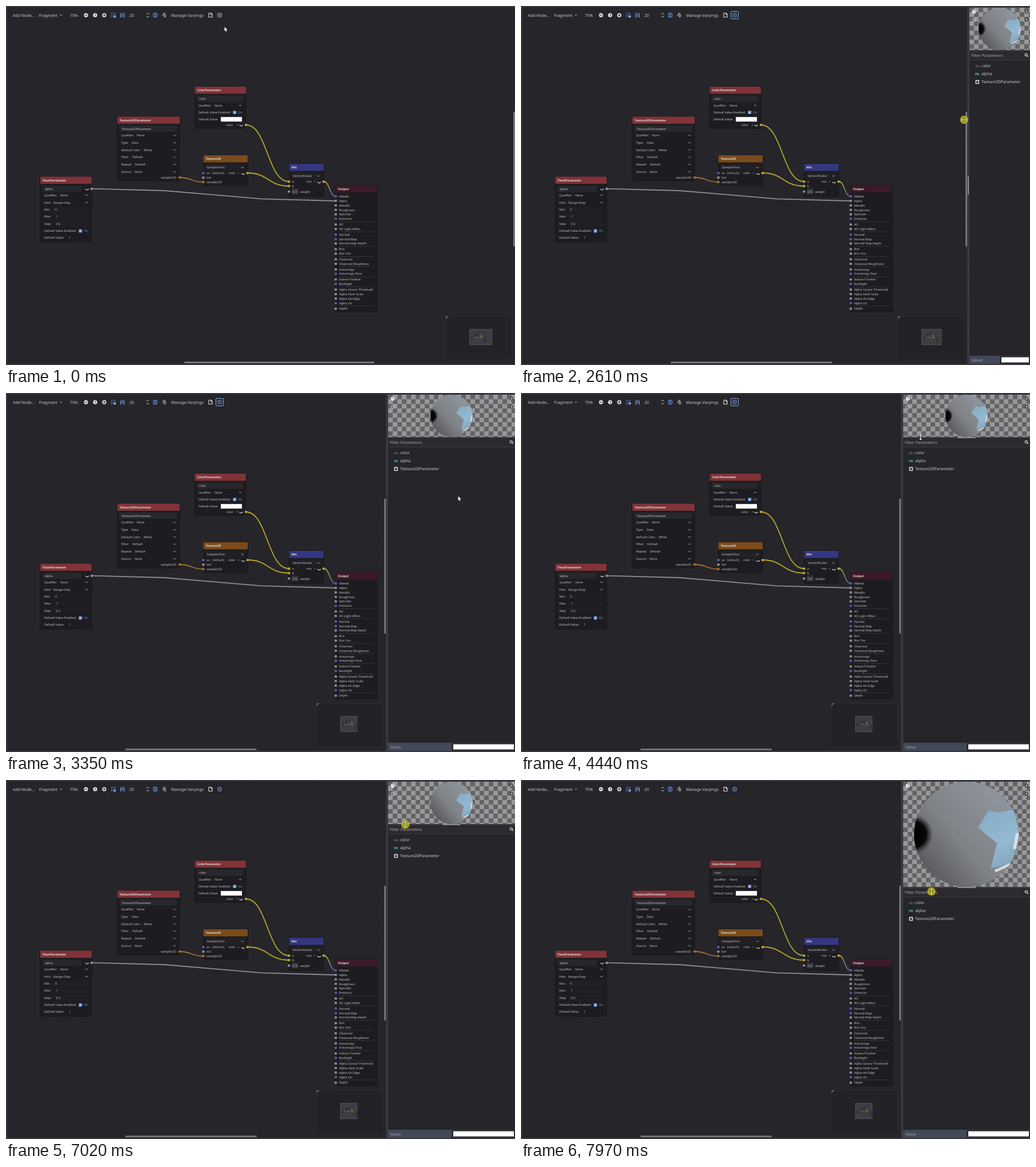
Animation, 891 px wide and 628 px high, one loop 8000 ms. Source, as an HTML page with a canvas:

```html
<!DOCTYPE html>
<html>
<head>
<meta charset="utf-8">
<title>Shader graph</title>
<style>
html, body { margin: 0; width: 100%; height: 100%; overflow: hidden; background: #25252a; }
canvas { display: block; }
</style>
</head>
<body>
<canvas id="stage" width="891" height="628"></canvas>
<script>
const W = 891, H = 628, LOOP = 8000;
const FONT = '"Noto Sans", "Open Sans", sans-serif';
const GREY = '#929296', YELLOW = '#b5a52c', PURPLE = '#5c5ab0', ORANGE = '#a8702c';
const BG = '#25252a', FRAME = '#38383f', BLUE = '#7f9fdc', INK = '#cfcfd3';
const view = document.getElementById('stage').getContext('2d');
const graph = document.createElement('canvas');
graph.width = W;
graph.height = H;
let c;

const clamp = (v, a, b) => Math.max(a, Math.min(b, v));
const smooth = u => u * u * (3 - 2 * u);
const between = (t, a, b) => t >= a && t < b;

function rect(x, y, w, h, fill) {
  c.fillStyle = fill;
  c.fillRect(x, y, w, h);
}
function round(x, y, w, h, r, fill, stroke) {
  c.beginPath();
  c.roundRect(x, y, w, h, r);
  if (fill) { c.fillStyle = fill; c.fill(); }
  if (stroke) { c.strokeStyle = stroke; c.lineWidth = 1; c.stroke(); }
}
function disc(x, y, r, fill) {
  c.beginPath();
  c.arc(x, y, r, 0, 7);
  c.fillStyle = fill;
  c.fill();
}
function line(points, color, width = 1) {
  c.beginPath();
  points.forEach(([x, y]) => c.lineTo(x, y));
  c.strokeStyle = color;
  c.lineWidth = width;
  c.stroke();
}
function text(s, x, y, size = 7, color = INK, weight = 400, align = 'left') {
  c.font = `${weight} ${size}px ${FONT}`;
  c.textAlign = align;
  c.fillStyle = color;
  c.fillText(s, x, y + size * 0.36);
}
const label = (s, x, y, color = '#c6c6ca', align = 'left') => text(s, x, y, 5.3, color, 400, align);
const chevron = (x, y, r = 2) => line([[x - r, y - r / 2], [x, y + r / 2], [x + r, y - r / 2]], '#c0c0c4', 0.9);
const port = (x, y, color = GREY) => disc(x, y, 2.2, color);

// ---- node graph ----
function node(x, y, w, h, title, color) {
  round(x - 0.5, y - 0.5, w + 1, h + 1, 2, '#121215');
  round(x, y, w, h, 1.5, '#1d1d21');
  round(x, y, w, 12.5, [1.5, 1.5, 0, 0], color);
  text(title, x + 4, y + 6.3, 5.3, '#e2dfe1', 700);
}
function option(name, x, y, value, vx, cx) {
  label(name, x, y);
  label(value, vx, y);
  chevron(cx, y);
}
function edit(s, x, y, w) {
  round(x, y - 5.5, w, 11, 1, '#27272c');
  label(s, x + 4, y);
}
function eye(x, y) {
  c.beginPath();
  c.arc(x, y - 1.5, 3, 0.4, 2.74);
  c.strokeStyle = '#d8d8dc';
  c.lineWidth = 1.2;
  c.stroke();
}
const arrowRight = (x, y) => line([[x - 1, y - 1.5], [x + 0.6, y], [x - 1, y + 1.5]], '#a8a8ac', 0.8);
function enabled(x, y) {
  label('Default Value Enabled:', x, y);
  round(x + 60.3, y - 2.9, 5.8, 5.8, 1, '#6d95de');
  line([[x + 61.7, y], [x + 62.9, y + 1.3], [x + 65, y - 1.5]], '#fff', 0.9);
  label('On', x + 69, y, BLUE);
}
function wire(x1, y1, x2, y2, from, to = from) {
  const mid = (x2 - x1) / 2, g = c.createLinearGradient(x1, y1, x2, y2);
  g.addColorStop(0, from);
  g.addColorStop(1, to);
  c.beginPath();
  c.moveTo(x1, y1);
  c.bezierCurveTo(x1 + mid, y1, x2 - mid, y2, x2, y2);
  c.strokeStyle = g;
  c.lineWidth = 1.8;
  c.stroke();
}
function wires() {
  line([[150, 319.7], [277, 323], [362, 330.2], [447, 337.3], [577, 341]], '#8c8c90', 1.8);
  wire(304, 300, 345, 308, ORANGE);
  wire(420, 208, 495, 307, YELLOW);
  wire(423, 292, 495, 315, YELLOW);
  wire(556, 307, 577, 333, YELLOW, PURPLE);
}
function floatNode() {
  node(60, 298.5, 90, 114.5, 'FloatParameter', '#813338');
  edit('alpha', 64, 319.7, 68);
  eye(142, 320);
  option('Qualifier:', 67, 331, 'None', 95, 141);
  option('Hint:', 67, 344, 'Range+Step', 83, 141);
  [['Min:', 356, '0', 86], ['Max:', 368.5, '1', 87.5], ['Step:', 381, '0.5', 87.5]].forEach(([s, y, v, x]) => {
    label(s, 67, y);
    rect(x - 4, y - 5, 148 - x, 10, '#202024');
    label(v, x, y);
  });
  enabled(67, 393.5);
  label('Default Value:', 67, 405.5);
  label('1', 110, 405.5);
  port(150, 319.7);
}
function textureParamNode() {
  node(195, 193.5, 109, 112.5, 'Texture2DParameter', '#813338');
  edit('Texture2DParameter', 198.5, 214.6, 101);
  [['Qualifier:', 'None', 229], ['Type:', 'Data', 220], ['Default Color:', 'White', 241],
   ['Filter:', 'Default', 221], ['Repeat:', 'Default', 225.5], ['Source:', 'None', 225]]
    .forEach(([s, v, x], i) => option(s, 201.5, 226.4 + i * 12.7, v, x, 295));
  label('sampler2D', 298, 300, undefined, 'right');
  port(304, 300, ORANGE);
}
function colorNode() {
  node(330.5, 141, 89.5, 73, 'ColorParameter', '#813338');
  edit('color', 334, 162, 81);
  option('Qualifier:', 337, 174, 'None', 365, 410);
  enabled(337, 186.2);
  label('Default Value:', 337, 198);
  rect(376, 194.2, 37, 8, '#fff');
  label('color', 398, 207.8, undefined, 'right');
  arrowRight(405, 208);
  eye(411.5, 208.3);
  port(420, 208, YELLOW);
}
function textureNode() {
  node(345.5, 261, 77.5, 53, 'Texture2D', '#7c4b1b');
  round(349, 277, 69, 11, 1, '#212125');
  option('SamplerPort', 351.5, 282.4, '', 0, 414);
  label('uv', 351, 292.3);
  label('[default]', 361, 292.3, '#b2b2b6');
  label('color', 401.5, 292.3, undefined, 'right');
  arrowRight(407, 292.3);
  eye(415, 293);
  label('lod', 351, 300.2);
  label('sampler2D', 351, 308);
  port(345.5, 292.3, PURPLE);
  port(345.5, 300.2);
  port(345.5, 308, ORANGE);
  port(423, 292.3, YELLOW);
}
function mixNode() {
  node(495.5, 276, 60.5, 57, 'Mix', '#34377f');
  round(499, 292, 53, 11, 1, '#212125');
  option('Vector4Scalar', 502, 297.4, '', 0, 547);
  label('a', 501, 307.2);
  label('mix', 535, 307.2, undefined, 'right');
  arrowRight(540.5, 307.2);
  eye(548, 308);
  label('b', 501, 315);
  round(500, 319.5, 12, 10, 1, '#34343a');
  label('0.5', 502, 324.6);
  label('weight', 515, 324.6);
  port(495.5, 307.2, YELLOW);
  port(495.5, 315, YELLOW);
  port(495.5, 324.6);
  port(556, 307.2, YELLOW);
}
function outputNode() {
  node(577, 313.5, 73, 221.5, 'Output', '#3d1a27');
  const groups = ['Albedo*,Alpha,Metallic,Roughness,Specular,Emission*', 'AO,AO Light Affect',
    'Normal*,Normal Map*,Normal Map Depth', 'Rim,Rim Tint', 'Clearcoat,Clearcoat Roughness',
    'Anisotropy,Anisotropy Flow*', 'Subsurf Scatter,Backlight*',
    'Alpha Scissor Threshold,Alpha Hash Scale,Alpha AA Edge,Alpha UV*', 'Depth'];
  let y = 333;
  groups.forEach((g, i) => {
    if (i) {
      y += 1.93;
      line([[583, y - 4.9], [645, y - 4.9]], '#39393f', 0.8);
    }
    g.split(',').forEach(s => {
      port(577.3, y, s.endsWith('*') ? PURPLE : GREY);
      label(s.replace('*', ''), 583, y);
      y += 7.87;
    });
  });
}

// ---- toolbar ----
function gridIcon(x, dots) {
  for (let i = 0; i < 9; i++) rect(x - 4 + i % 3 * 3, 12 + (i / 3 | 0) * 3, 1.6, 1.6, '#5f84cf');
  if (dots) disc(x + 2.5, 18.5, 2, '#88a9ee');
  else line([[x - 3, 20], [x - 3, 15], [x + 3, 15], [x + 3, 20]], '#88a9ee', 1);
}
function zoomIcon(x, kind) {
  disc(x, 16, 3.6, '#e4e4e6');
  if (kind === '1') return text('1', x, 16, 5.5, BG, 700, 'center');
  rect(x - 2, 15.4, 4, 1.2, BG);
  if (kind === '+') rect(x - 0.6, 14, 1.2, 4, BG);
}
function toolbar() {
  text('Add Node...', 12, 16);
  text('Fragment', 58, 16);
  chevron(96, 16, 2.2);
  text('75%', 112, 16);
  zoomIcon(140, '-');
  zoomIcon(156, '1');
  zoomIcon(172, '+');
  gridIcon(188, true);
  gridIcon(204, false);
  text('20', 216, 16);
  line([[245.8, 14.4], [248, 12.4], [250.2, 14.4]], INK, 1);
  line([[245.8, 17.6], [248, 19.6], [250.2, 17.6]], INK, 1);
  round(258, 12.5, 6.5, 7, 1, '#2b3b5e', '#6f95e2');
  line([[261.2, 12], [261.2, 20]], '#6f95e2', 1);
  rect(273.5, 15.3, 7, 1.3, INK);
  rect(275, 12.5, 4, 1.3, INK);
  rect(276, 18, 4, 1.3, INK);
  text('Manage Varyings', 289, 16);
  line([[359, 12.5], [355, 12.5], [355, 19.5], [361, 19.5], [361, 14.5], [359, 12.5], [359, 15], [361, 15]], '#dedee0', 1.1);
}
function buildGraph() {
  c = graph.getContext('2d');
  c.textRendering = 'geometricPrecision';
  rect(0, 0, W, H, FRAME);
  rect(2, 2, W, 624, BG);
  for (let j = 0, y = 6; y < 624; y += 7.5, j++)
    for (let i = 0, x = 8; x < W; x += 7.5, i++)
      rect(x - 0.5, y - 0.5, 1, 1, (i + 3) % 5 || j % 5 ? '#28282d' : '#2e2e34');
  wires();
  [floatNode, textureParamNode, colorNode, textureNode, mixNode, outputNode, toolbar].forEach(f => f());
}

// ---- moving parts ----
function minimap(p) {
  const x = p - 126;
  rect(x, 542, 117, 78, '#222227');
  c.strokeStyle = '#2b2b30';
  c.lineWidth = 1;
  c.strokeRect(x + 0.5, 542.5, 116, 77);
  line([[x + 1.5, 547], [x + 1.5, 543.7], [x + 5, 543.7]], '#9a9a9e', 1);
  const w = 40 * p / 895;
  rect(x + 42, 565, w, 28, '#3d3d42');
  c.strokeStyle = '#505056';
  c.strokeRect(x + 42.5, 565.5, w - 1, 27);
  c.save();
  c.translate(x + 42, 565);
  c.scale(0.0447, 0.0447);
  [[60, 298, 90, 115], [195, 193, 109, 113], [330, 141, 90, 73], [345, 261, 78, 53], [495, 276, 61, 57], [577, 313, 73, 222]]
    .forEach(r => rect(...r, '#303035'));
  c.scale(1, 1);
  line([[150, 320], [577, 341]], '#77777a', 14);
  line([[304, 300], [345, 308]], ORANGE, 16);
  line([[420, 208], [495, 307]], YELLOW, 16);
  line([[423, 292], [495, 315]], YELLOW, 16);
  c.restore();
}
function sphere(x, y, r, dy, dark) {
  c.save();
  c.translate(x, y);
  c.scale(r, r);
  c.beginPath();
  c.arc(0, 0, 1, 0, 7);
  c.clip();
  let g = c.createLinearGradient(-0.9, 0.5, 0.5, -0.7);
  g.addColorStop(0, '#5b5c5f');
  g.addColorStop(0.45, '#7f8286');
  g.addColorStop(1, '#8d939a');
  rect(-1, -1, 2, 2, g);
  c.globalAlpha = dark;
  g = c.createRadialGradient(-1.02, dy, 0.1, -1.02, dy, 0.38);
  g.addColorStop(0, '#000');
  g.addColorStop(0.55, '#0a0a0b');
  g.addColorStop(1, 'rgba(40,40,42,0)');
  rect(-1, -1, 1, 2, g);
  c.globalAlpha = 1;
  c.translate(0, dy);
  const shape = (pts, fill) => {
    c.beginPath();
    pts.forEach(q => c.lineTo(...q));
    c.fillStyle = fill;
    c.fill();
  };
  g = c.createLinearGradient(0.3, -0.5, 0.9, 0.6);
  g.addColorStop(0, '#86abc4');
  g.addColorStop(0.6, '#93bad2');
  g.addColorStop(1, '#82a4b9');
  shape([[0.42, -0.45], [0.62, -0.42], [0.9, -0.47], [1, 0], [0.86, 0.56], [0.46, 0.65], [0.58, 0.17], [0.22, -0.13]], g);
  line([[0.97, -0.02], [0.91, 0.28]], '#d9dfe2', 0.06);
  line([[0.54, 0.7], [0.72, 0.62], [0.88, 0.55]], '#d5dade', 0.05);
  c.restore();
}
function preview(p, h, dy, dark) {
  c.save();
  c.beginPath();
  c.rect(p, 3, W - p, h);
  c.clip();
  rect(p, 3, W - p, h, '#98989a');
  for (let j = 0; j * 8 < h; j++)
    for (let i = j % 2; p + i * 8 < W; i += 2) rect(p + i * 8, 3 + j * 8, 8, 8, '#646466');
  sphere((p + W) / 2, 3 + h / 2, h / 2, dy, dark);
  disc(p + 8, 10, 3.4, '#e8e8ea');
  disc(p + 9, 9, 1.2, '#8a8a8d');
  round(p + 5.5, 22, 5, 5, 1, null, '#bdbdc0');
  [10, 24].forEach(y => {
    disc(885, y, 3, '#3c3c40');
    disc(885, y, 1.4, '#d0d0d2');
  });
  c.restore();
}
function panel(p, s, t) {
  const right = W - p;
  rect(p - 4, 0, right + 4, H, FRAME);
  rect(p, 3, right, 623, BG);
  let dy = 0;
  if (between(t, 5030, 6400)) dy = clamp((pointer(t)[1] - 77) / 80, -0.15, 0.25);
  const dark = t < 5900 ? 1 : t < 7000 ? clamp(1 - (t - 5900) / 400, 0, 1) : clamp((t - 7150) / 400, 0, 1);
  preview(p, 74 + s, dy, dark);
  rect(p, 77 + s, right, 2, FRAME);
  rect(p, 79 + s, right, 15, '#2a2a2f');
  rect(p, 94 + s, right, 1, '#3a3a40');
  text('Filter Parameters', p + 3, 86.3 + s, 7, '#a6a6aa');
  c.beginPath();
  c.arc(884.3, 85.3 + s, 2.1, 0, 7);
  c.strokeStyle = '#dcdcde';
  c.lineWidth = 1.1;
  c.stroke();
  line([[885.8, 86.8 + s], [888, 89 + s]], '#dcdcde', 1.2);
  ['color', 'alpha', 'Texture2DParameter'].forEach((name, i) => text(name, p + 21, 104.8 + i * 14 + s));
  [['c', '#d96a6a'], ['l', '#7fd07a'], ['r', '#6c9be8']].forEach(([ch, col], i) =>
    text(ch, p + 10.2 + i * 3, 104.8 + s, 5, col, 700));
  text('Flt', p + 10, 118.8 + s, 5.5, '#62d2ee', 700);
  round(p + 10.5, 129.6 + s, 6.6, 6.6, 1, '#e2e2e4');
  rect(p + 12, 131 + s, 3.6, 3.6, '#4a4a4e');
  rect(p + 12, 133 + s, 3.6, 1.6, '#1e1e22');
  rect(p, 611, right, 15, '#2d2d33');
  rect(p, 612, right / 2, 14, '#434857');
  text('Value:', p + 4, 619, 7, '#9ea3b2');
  rect(p + right / 2 + 3, 614.5, right / 2 - 5, 9, '#fff');
}

const path = [[0, 382.5, 36.5], [240, 382.5, 36.5], [330, 378.5, 19], [950, 378.5, 19], [1500, 787.5, 196.5],
  [1680, 787.5, 196.5], [1730, 791, 196.5], [1769, 791, 196.5], [1770, 792, 199], [2390, 792, 199], [3229, 668, 199],
  [3230, 791.5, 195], [3350, 791.5, 180.5], [3900, 697.5, 72], [4109, 697.5, 72], [4110, 699.5, 77], [5030, 699.5, 77],
  [5250, 698, 119], [5450, 701.3, 87.5], [5840, 696, 50], [6050, 692, 25], [6400, 699, 78], [8000, 699, 78]];

const dragU = t => clamp((t - 2390) / 710, 0, 1);
function splitX(t) {
  return t < 570 ? 895 : 793 - 124 * smooth(Math.pow(dragU(t), 1.6));
}
function pointer(t) {
  if (between(t, 2390, 3230)) return [splitX(t) - 1 - 10 * Math.sin(Math.PI * dragU(t)), 199];
  if (t >= 7110) {
    const u = clamp((t - 7110) / 860, 0, 1);
    return [699 + 19.5 * u, 78 + 117 * Math.pow(u, 1.07)];
  }
  let i = 1;
  while (path[i][0] < t) i++;
  const [t0, x0, y0] = path[i - 1], [t1, x1, y1] = path[i];
  const u = smooth((t - t0) / (t1 - t0));
  return [x0 + (x1 - x0) * u, y0 + (y1 - y0) * u];
}
function drawPointer(t) {
  const [x, y] = pointer(t);
  const sideways = between(t, 1770, 3230);
  const upright = between(t, 4110, 6400) || t >= 6400;
  const pressed = between(t, 490, 650) || between(t, 2390, 3100) || between(t, 4620, 6400) || t >= 7020;
  if (pressed) disc(x, y, 7.3, 'rgba(188,180,22,0.86)');
  c.save();
  c.translate(x, y);
  c.lineJoin = 'round';
  c.beginPath();
  if (sideways || upright) {
    if (upright) c.rotate(Math.PI / 2);
    [[-5.5, 0], [-3, -2.5], [-3, -0.6], [3, -0.6], [3, -2.5], [5.5, 0], [3, 2.5], [3, 0.6], [-3, 0.6], [-3, 2.5]]
      .forEach(q => c.lineTo(...q));
  } else {
    [[0, 0], [0, 7.6], [1.7, 6.1], [2.9, 8.8], [4.1, 8.2], [2.9, 5.6], [5.3, 5.5]].forEach(q => c.lineTo(...q));
  }
  c.closePath();
  c.strokeStyle = '#111';
  c.lineWidth = 0.9;
  c.stroke();
  c.fillStyle = '#fff';
  c.fill();
  c.restore();
}
function previewButton(t) {
  const on = t >= 570;
  if (on) round(367.5, 9.5, 13, 13, 1.5, '#1f2025', t < 4620 ? '#8fb0d8' : null);
  else if (t >= 330) round(367, 9, 14, 14, 1.5, '#34343a');
  const col = on ? '#7c9ddf' : '#b4b4b8';
  round(370.7, 12.7, 6.6, 6.6, 1, null, col);
  round(372.7, 14.5, 2.6, 3, 1, null, col);
}
function draw(t) {
  c = view;
  const p = splitX(t), s = clamp(pointer(t)[1] - 85, 0, 110) * (t >= 7110);
  c.drawImage(graph, 0, 0);
  previewButton(t);
  minimap(p);
  const cut = 895 - p;
  round(312 - 0.456 * cut, 622, 333 - 0.456 * cut, 3, 1.5, '#737378');
  round(p - 7, 184.5, 3, 236.5, 1.5, between(t, 1480, 1700) ? '#d2d2d5' : '#737378');
  if (t >= 570) panel(p, s, t);
  if (between(t, 1770, 1810) || between(t, 2140, 3230)) round(p - 3, 298, 2, 32, 1, '#8c8c91');
  if (between(t, 4230, 4620) || t >= 6650) round((p + W) / 2 - 16, 77 + s, 32, 2, 1, '#8c8c91');
  drawPointer(t);
}

buildGraph();
view.textRendering = 'geometricPrecision';
const begin = performance.now();
function tick() {
  draw((performance.now() - begin) % LOOP);
  requestAnimationFrame(tick);
}
tick();
</script>
</body>
</html>
```
